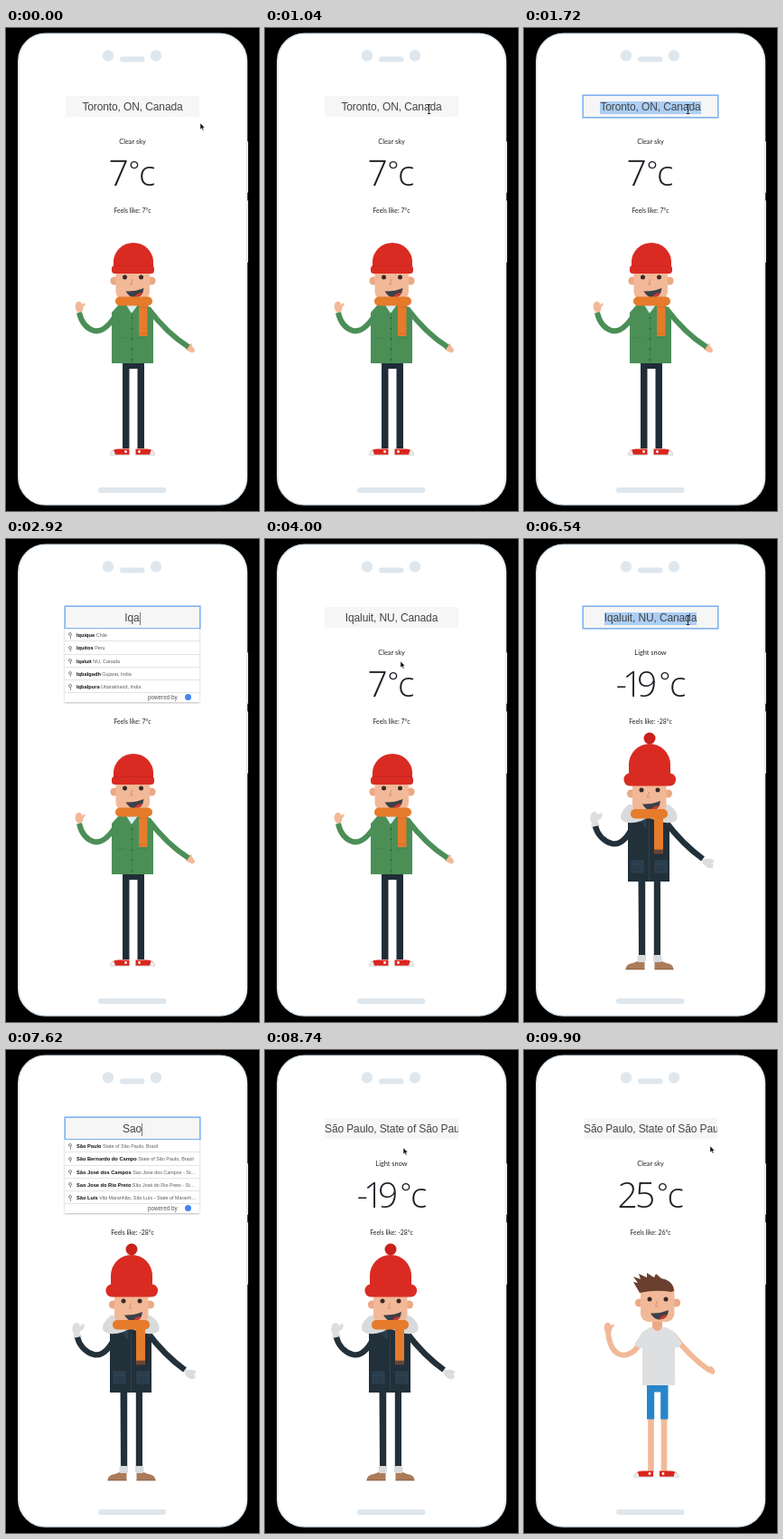
An HTML page for the animation above (9920 ms loop, 280 by 533 pixels).

```html
<!DOCTYPE html>
<html lang="en">
<head>
<meta charset="utf-8">
<title>Weather outfit</title>
<style>
html, body { margin: 0; width: 100%; height: 100%; overflow: hidden; background: #000; }
body { position: relative; font-family: "Liberation Sans", Arial, sans-serif; }
svg { position: absolute; left: 0; top: 0; }
#field {
  position: absolute; left: 66px; top: 75px; width: 148px; height: 23px;
  background: #f6f6f6; color: #444; font-size: 12px; line-height: 24px; letter-spacing: -.12px;
  text-align: center; white-space: nowrap;
}
#clip { overflow: hidden; height: 23px; }
#query { display: inline-block; line-height: 13.5px; }
#query.typing { border-right: .8px solid #777; }
#list {
  position: absolute; left: 65px; top: 99px; width: 149px; height: 81px;
  background: #fff; box-shadow: 0 1px 2px #0004; color: #5c5c5c; font-size: 5.4px;
}
.row {
  box-sizing: border-box; height: 14.3px; padding: 0 3px 0 13px; line-height: 14.3px;
  border-bottom: .6px solid #e4e4e4; position: relative;
  white-space: nowrap; overflow: hidden; text-overflow: ellipsis;
}
.row b { font-size: 5.7px; color: #111; }
.row::before {
  content: ""; position: absolute; left: 4.3px; top: 4.3px; width: 2px; height: 2px;
  border: .9px solid #888; border-radius: 50%;
}
.row::after {
  content: ""; position: absolute; left: 5.7px; top: 8px; width: 1px; height: 2.6px; background: #999;
}
#credit { position: absolute; left: 92px; top: 71.5px; font-size: 6.3px; line-height: 8px; color: #555; }
#credit i {
  position: absolute; left: 41px; top: .5px; width: 7px; height: 7px; border-radius: 50%; background: #4285f4;
}
.small { font-family: Lato, sans-serif; text-anchor: middle; fill: #222; }
.big { font: 300 39px "Open Sans", Lato, sans-serif; fill: #1d1d24; }
</style>
</head>
<body>
<svg width="280" height="533" viewBox="0 0 280 533">
  <defs>
    <g id="face">
      <circle cx="120" cy="279" r="4.6" fill="#eba985"/>
      <circle cx="161" cy="279" r="4.6" fill="#eba985"/>
      <rect x="121.500" y="256" width="37.500" height="44" rx="9" fill="#f2b998"/>
      <circle cx="131.500" cy="275" r="2.500" fill="#3a2a28"/>
      <circle cx="149.500" cy="275" r="2.500" fill="#3a2a28"/>
      <path d="M140 277l-2 6h3" fill="none" stroke="#dc9674" stroke-width="1.200"/>
      <path d="M132.500 290.500Q143 291 152.500 287Q151.500 297.500 142.500 297.500Q136 297 132.500 290.500z" fill="#3d4049"/>
      <path d="M142 297.300Q144 292.500 151 292Q148.500 297.500 142 297.300z" fill="#d8352b"/>
    </g>
    <g id="shoe">
      <path d="M115 471q1-6 9-6.500h12.500v6.500z" fill="#d9261c"/>
      <path d="M115 471q.5-4 4.500-5l1.500 5z" fill="#eceff1"/>
      <circle cx="132.500" cy="467.500" r="1.400" fill="#fff"/>
      <path d="M115 471.400h21.500" stroke="#dfe2e4" stroke-width="1.400"/>
    </g>
    <g id="shoes"><use href="#shoe"/><use href="#shoe" transform="matrix(-1 0 0 1 280 0)"/></g>
    <g id="hand">
      <ellipse rx="4.300" ry="6.300" transform="rotate(-8)"/>
      <path d="M2 1l3.500-4" fill="none" stroke="#f2b998" stroke-width="2.600" stroke-linecap="round"/>
    </g>
    <g id="boot">
      <path d="M112.500 475q0-6 8-7l5-2h8v9z" fill="#ab7c5a"/>
      <path d="M112.500 474.800h21" stroke="#8b5d3a" stroke-width="1"/>
      <rect x="125.500" y="459" width="9.500" height="8" rx="2" fill="#d9dadb"/>
    </g>
  </defs>

  <rect x="265" y="125" width="3" height="57" rx="1" fill="#dde7ef"/>
  <rect x="265" y="190" width="3" height="69" rx="1" fill="#dde7ef"/>
  <rect x="13.800" y="6.300" width="252.700" height="519.700" rx="30" fill="#fff" stroke="#dde7ef" stroke-width="1.500"/>
  <g fill="#dfe7ee">
    <circle cx="113" cy="30.500" r="6.200"/><circle cx="166" cy="30.500" r="6.200"/>
    <rect x="126" y="31.500" width="27.500" height="6" rx="3"/>
    <rect x="102" y="507" width="75.500" height="6" rx="3"/>
  </g>

  <text id="sky" class="small" x="140" y="127.500" font-size="7.400"></text>
  <text id="temp" class="big" y="174"></text>
  <g id="unit">
    <text class="big" x="-12.500" y="167.500" style="font-size:30px">°</text>
    <text class="big" x="-1" y="174">c</text>
  </g>
  <text id="feels" class="small" x="140" y="204" font-size="6.900"></text>

  <g class="person">
    <path d="M129 368h24v96h-7.500v-88h-9v88h-7.500z" fill="#1f2d38"/>
    <use href="#shoes"/>
    <g fill="#f2b998">
      <use href="#hand" x="81" y="308"/>
      <path d="M200 350l5-2 1 3 3 4q0 4-4 3l-6-3z"/>
    </g>
    <path d="M124 313C114 330 105 336 97 334C88 331 83 323 81 314M157 309C169 325 186 342 202 352" fill="none" stroke="#4b8f57" stroke-width="6"/>
    <path d="M125 305h31l7 9v56h-46v-56z" fill="#4b8f57"/>
    <path d="M132 304h15l-8 11z" fill="#d9eef2"/>
    <path d="M139.500 314v56M122 342h10M146 342h10" stroke="#3d7c49" stroke-width=".7"/>
    <path d="M139.500 320v48" stroke="#2c5f37" stroke-width="1.800" stroke-linecap="round" stroke-dasharray="0 11.500"/>
    <use href="#face"/>
    <rect x="147" y="302" width="9.500" height="38" rx="1" fill="#e67b2c"/>
    <path d="M147 337h9.500M147 308h9.500" stroke="#d46d26" stroke-width="1"/>
    <rect x="121" y="296.500" width="41" height="10" rx="5" fill="#e67b2c"/>
    <path d="M119 266v-8a22 21 0 0 1 44 0v8z" fill="#d92b22"/>
    <rect x="117" y="262" width="47" height="9" rx="3.500" fill="#d92b22"/>
    <path d="M119 262.500h43" stroke="#c3231c" stroke-width=".7"/>
  </g>

  <g class="person">
    <path d="M126.500 374h24.500v88h-7.200v-84h-9.600v84h-7.200z" fill="#22303a"/>
    <use href="#boot"/><use href="#boot" transform="matrix(-1 0 0 1 278 0)"/>
    <g fill="#dcdddd">
      <ellipse cx="78" cy="308" rx="4.700" ry="7"/><ellipse cx="84" cy="306" rx="2.300" ry="4" transform="rotate(25 84 306)"/>
      <rect x="74.500" y="313" width="9" height="6" rx="2.500"/>
      <ellipse cx="203.500" cy="358" rx="7" ry="4" transform="rotate(38 203.500 358)"/>
      <ellipse cx="206" cy="355" rx="4.500" ry="2" transform="rotate(12 206 355)"/>
    </g>
    <path d="M122 314C114 332 105 338 97 336C87 333 81 325 79 317M156 311C168 327 184 343 198 353" fill="none" stroke="#22303a" stroke-width="6.400"/>
    <path d="M123 303h31l7 10v65h-46v-65z" fill="#22303a"/>
    <path d="M138.500 312v66" stroke="#34454f" stroke-width=".8"/>
    <g fill="#283c4b" stroke="#3a5060" stroke-width=".6">
      <path d="M119 355h13v13h-13zM145 355h13v13h-13zM119 359h13M145 359h13M128 310h7v9z"/>
    </g>
    <path d="M116 293q-12 10-8 17q7 6 22 1l8-4 9 4q15 5 22-1q3-9-9-17z" fill="#d9dadb"/>
    <use href="#face" x="-1.500" y="2"/>
    <rect x="144" y="302" width="10" height="41" fill="#e67b2c"/>
    <path d="M144 345h10" stroke="#7d4f38" stroke-width="5" stroke-dasharray="1.500 .6"/>
    <rect x="118" y="298" width="41" height="10.500" rx="5" fill="#e67b2c"/>
    <circle cx="139" cy="220" r="6.500" fill="#c9211b"/>
    <path d="M116 266v-17a23 23 0 0 1 46 0v17z" fill="#d92b22"/>
    <rect x="110.500" y="258.500" width="57.500" height="14" rx="6.500" fill="#d92b22"/>
  </g>

  <g class="person">
    <path d="M140.500 400v66M155 400v66" stroke="#f2b998" stroke-width="6.600"/>
    <path d="M136 368h23.500v39.500h-8.300v-30h-7v30h-8.200z" fill="#2885c9"/>
    <use href="#shoes" x="6.500"/>
    <g fill="#f2b998">
      <use href="#hand" x="93" y="307"/>
      <path d="M203 350l5-1 3 4q1 5-3 5l-6-4z"/>
    </g>
    <path d="M133 317C124 334 113 340 104 335C97 331 94 322 93 311M164 313C176 329 191 344 206 354" fill="none" stroke="#f2b998" stroke-width="6"/>
    <path d="M140 306l-9 5-9 14 7 5 2-2v42h36v-42l2 1 6-5-10-14-8-4z" fill="#dedfe1"/>
    <path d="M142 296h11v10q-5 8-11 0z" fill="#eba985"/>
    <use href="#face" x="7.500"/>
    <path d="M128 268L121 256L126 257L121 250L129 253L127 247L136 251L136 246L144 251L146 247L152 252Q165 254 166 266L163 267Q146 264 128 268z" fill="#69402f"/>
  </g>
</svg>

<div id="field"><div id="clip"><span id="query"></span></div></div>
<div id="list"></div>

<svg width="280" height="533" viewBox="0 0 280 533">
  <path id="arrow" d="M0 0v7l1.600-1.500 1.200 2.500 1.200-.5-1.200-2.500h2.200z" fill="#111" stroke="#fff" stroke-width=".4"/>
  <path id="beam" d="M-1.800-5h3.600M0-5v10M-1.800 5h3.600" fill="none" stroke="#222" stroke-width=".9"/>
</svg>

<script>
const LOOP = 9920;
const $ = id => document.getElementById(id);
const people = document.querySelectorAll('.person');

// x places the digits, unit is the left edge of the "c".
const cities = [
  { name: 'Toronto, ON, Canada', sky: 'Clear sky', temp: '7', x: '113.5', unit: 148, feels: '7' },
  { name: 'Iqaluit, NU, Canada', sky: 'Light snow', temp: '-19', x: '101.5 109 125', unit: 162, feels: '-28' },
  { name: 'São Paulo, State of São Paulo, Brazil', sky: 'Clear sky', temp: '25', x: '103.5 123', unit: 159.5, feels: '26' }
];

const suggestions = [
  [['Iquique', 'Chile'], ['Iquitos', 'Peru'], ['Iqaluit', 'NU, Canada'],
    ['Iqbalgadh', 'Gujarat, India'], ['Iqbalpura', 'Uttarakhand, India']],
  [['São Paulo', 'State of São Paulo, Brazil'],
    ['São Bernardo do Campo', 'State of São Paulo, Brazil'],
    ['São José dos Campos', 'Sao Jose dos Campos - State of São Paulo'],
    ['Sao Jose do Rio Preto', 'São José do Rio Preto - State of São Paulo'],
    ['São Luís', 'Vila Maranhão, São Luís - State of Maranhão']]
];

// Each edit: focus, highlight, typed text with times, list opening, choice made, weather loaded.
const edits = [
  { focus: 1260, select: 1460, keys: [[2480, 'I'], [2640, 'Iq'], [2860, 'Iqa']], open: 2680, pick: 3960, load: 4400 },
  { focus: 6080, select: 6280, keys: [[7040, 'S'], [7200, 'Sa'], [7420, 'Sao']], open: 7260, pick: 8640, load: 8880 }
];

const pointer = [
  [0, 215, 105], [20, 215, 105], [760, 181.5, 89.5], [3440, 181.5, 89.5], [3740, 150, 135],
  [4400, 150, 135], [4940, 181.5, 89.5], [8120, 181.5, 89.5], [8420, 140, 106],
  [8640, 140, 106], [9020, 215, 117], [9800, 215, 117], [9900, 206, 106], [LOOP, 206, 106]
];

const lists = suggestions.map(rows => rows.map(([name, place]) =>
  `<div class="row"><b>${name}</b> ${place}</div>`
).join('') + '<div id="credit">powered by<i></i></div>');

const show = (el, on) => { el.style.display = on ? '' : 'none'; };
let shownCity, shownList;

function drawWeather(n) {
  if (n === shownCity) return;
  shownCity = n;
  const c = cities[n];
  $('sky').textContent = c.sky;
  $('temp').textContent = c.temp;
  $('temp').setAttribute('x', c.x);
  $('unit').setAttribute('transform', `translate(${c.unit})`);
  $('feels').textContent = `Feels like: ${c.feels}°c`;
  people.forEach((p, i) => show(p, i === n));
}

function drawField(t) {
  const city = cities[edits.filter(e => t >= e.pick).length];
  const n = edits.findIndex(e => t >= e.focus && t < e.pick);
  const edit = edits[n];
  const key = edit && edit.keys.filter(k => t >= k[0]).pop();
  const query = $('query');
  query.textContent = key ? key[1] : city.name;
  query.className = key ? 'typing' : '';
  query.style.background = edit && !key && t >= edit.select ? '#accef5' : '';
  const ring = edit ? Math.min(1, (t - edit.focus) / 160) : 0;
  $('field').style.boxShadow = ring ? `0 0 0 1.6px rgba(126,178,238,${ring})` : 'none';
  const open = edit && t >= edit.open;
  show($('list'), open);
  if (open && shownList !== n) {
    shownList = n;
    $('list').innerHTML = lists[n];
  }
}

function drawPointer(t) {
  const i = pointer.findIndex(k => k[0] > t);
  const [t0, x0, y0] = pointer[i - 1], [t1, x1, y1] = pointer[i];
  const p = (t - t0) / (t1 - t0), e = p * p * (3 - 2 * p);
  const x = x0 + (x1 - x0) * e, y = y0 + (y1 - y0) * e;
  const hidden = (t >= 2480 && t < 3440) || (t >= 7040 && t < 8120);
  const inField = y < 98 && x < 214;
  for (const id of ['arrow', 'beam']) {
    show($(id), !hidden && inField === (id === 'beam'));
    $(id).setAttribute('transform', `translate(${x} ${y})`);
  }
}

function frame() {
  const t = performance.now() % LOOP;
  drawWeather(edits.filter(e => t >= e.load).length);
  drawField(t);
  drawPointer(t);
  requestAnimationFrame(frame);
}
frame();
</script>
</body>
</html>
```
